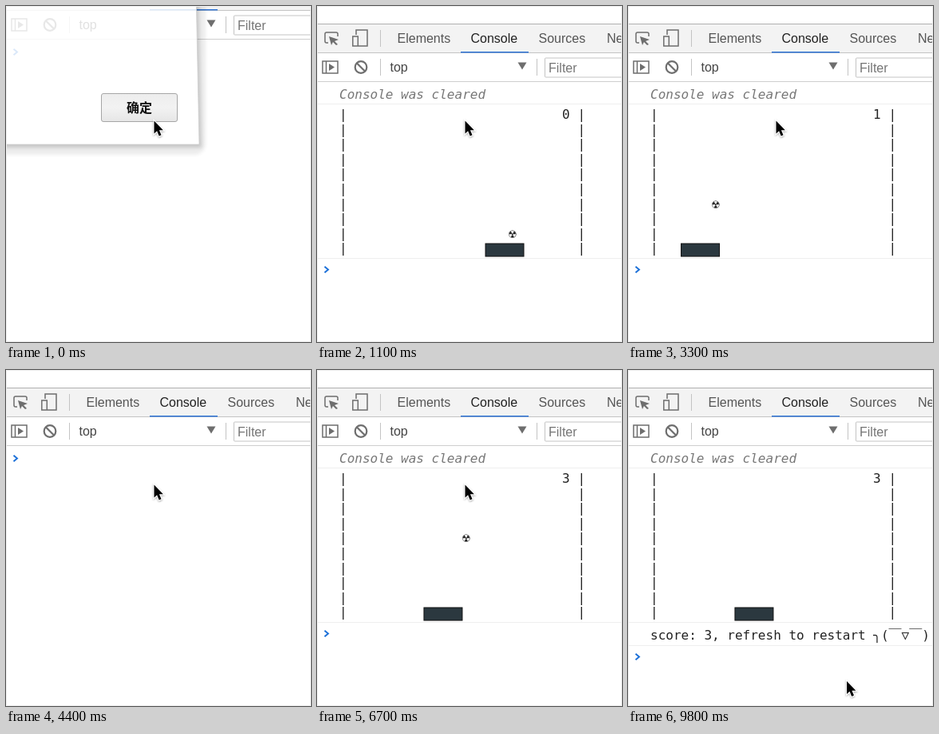
Write an HTML page that moves like this. It is 382x420 px and loops after 9900 ms.

```html
<!DOCTYPE html>
<html lang="zh">
<meta charset="utf-8">
<title>Console paddle game</title>
<style>
  html, body { margin: 0; height: 100%; overflow: hidden; background: #fff; }
  svg { display: block; }
  text { font: 16px "Liberation Sans", Arial, sans-serif; fill: #555; white-space: pre; }
  .mono text { font-family: "DejaVu Sans Mono", "Noto Sans CJK SC", monospace; fill: #222; }
  .mono .note { font-style: italic; fill: #777; }
  .icon { fill: none; stroke: #6e6e6e; stroke-width: 1.5; }
  .line { fill: none; stroke: #c4c4c4; }
  .soft { fill: none; stroke: #eee; }
</style>
<svg width="382" height="420" viewBox="0 0 382 420">
  <defs>
    <linearGradient id="face" x2="0" y2="1">
      <stop stop-color="#ededed"/><stop offset=".5" stop-color="#f2f2f2"/><stop offset="1" stop-color="#e6e6e6"/>
    </linearGradient>
    <filter id="blur" x="-20%" y="-20%" width="140%" height="140%"><feGaussianBlur stdDeviation="2"/></filter>
    <filter id="shade" x="-50%" y="-50%" width="200%" height="200%">
      <feDropShadow dx="0" dy="1" stdDeviation="1.2" flood-opacity=".4"/>
    </filter>
    <clipPath id="under"><path d="M0 0H238L242 173H0z"/></clipPath>
  </defs>
  <g id="page">
    <path fill="#f3f3f3" d="M0 22h382v36H0z"/>
    <path class="line" d="M0 58.500h382M79.500 30v21M79.500 66v21M275.500 66v21"/>
    <path class="line" style="stroke:#b0b0b0" d="M0 22.500h382"/>
    <path class="line" stroke-opacity=".8" d="M0 94.500h382"/>
    <path fill="#2f74d6" d="M180 57h85v1.500h-85z"/>
    <g class="icon">
      <path d="M14 46h-2q-2 0-2-2V35q0-2 2-2h12q2 0 2 2v3"/>
      <path d="M15 38l12 4-5 2 4 4-2 1-4-4-2 4z" fill="#6e6e6e" stroke="none"/>
      <path d="M49 36V30h14v20h-11M44.800 38h6.500v12h-6.500z"/>
      <path d="M7 69h19v15H7zM11.500 69v15"/>
      <path d="M15 72l7 4.500-7 4.500z" fill="#6e6e6e" stroke="none"/>
      <circle cx="55" cy="76.500" r="7.300" stroke-width="2.200"/>
      <path d="M50 71.500l10 10" stroke-width="2.200"/>
    </g>
    <text x="100.500" y="45.500">Elements</text>
    <text x="192.500" y="45.500" style="fill:#222">Console</text>
    <text x="277.500" y="45.500">Sources</text>
    <text x="363" y="45.500">Network</text>
    <text x="91.500" y="81.500" style="fill:#444">top</text>
    <path fill="#6e6e6e" d="M251.500 70.500h11l-5.500 9z"/>
    <rect class="line" x="285.500" y="65" width="110" height="24" rx="1" style="fill:#fff"/>
    <text x="290" y="82.500" style="fill:#757575">Filter</text>
    <g id="log" class="mono">
      <text class="note" x="28" y="116">Console was cleared</text>
      <path class="soft" d="M0 122.500h382M0 315.500h382"/>
      <g id="walls"></g>
      <text id="score" x="307" y="141"></text>
      <text id="ball" text-anchor="middle">☢</text>
      <rect id="paddle" y="297" width="48" height="16" fill="#2b383f" stroke="#111"/>
      <g id="over">
        <text x="28" y="337">score: 3, refresh to restart ╮(￣▽￣)╭</text>
        <path class="soft" d="M0 344.500h382"/>
      </g>
    </g>
    <path id="prompt" d="M9.500-3.700l4.500 3.700-4.500 3.700" fill="none" stroke="#1a6fd8" stroke-width="1.900"/>
  </g>
  <g id="dialog">
    <rect x="-20" y="-20" width="270" height="206" rx="14" opacity=".07" filter="url(#blur)"/>
    <path d="M-20-20H241L245 177H-20z" opacity=".15" filter="url(#blur)"/>
    <path d="M-20-20H238L242 173H-20z" fill="#fff" stroke="#ccc" stroke-width=".7"/>
    <g opacity=".16" clip-path="url(#under)"><use href="#page"/></g>
    <rect x="119.500" y="109.500" width="95" height="35" rx="2.500" fill="url(#face)" stroke="#a6a6a6"/>
    <text x="167" y="133" text-anchor="middle" style="font:700 16px 'Noto Sans CJK SC','Noto Sans CJK',sans-serif;fill:#111">确定</text>
  </g>
  <path class="soft" d="M.5.500h381v419H.500z"/>
  <g id="cursor" filter="url(#shade)">
    <path d="M0 0v16l3.600-3.300 2.600 6.200 2.800-1.200-2.600-6h5z" stroke="#fff" stroke-width="2" paint-order="stroke"/>
  </g>
</svg>
<script>
const $ = id => document.getElementById(id);
const LOOP = 9900, STEP = 154, CELL = 9.632, ROW = 18.6;
const colX = col => 28 + col * CELL;
const rowY = row => 141 + row * ROW;
const show = (id, on) => $(id).style.display = on ? '' : 'none';
const move = (id, x, y) => $(id).setAttribute('transform', `translate(${x} ${y})`);

for (let row = 0; row < 10; row++)
  for (const col of [0, 31])
    $('walls').innerHTML += `<text x="${colX(col)}" y="${rowY(row)}">|</text>`;

// Paddle column over time: [ms, column]
const paddleKeys = [[300, 13], [900, 19], [1500, 19], [2900, 4], [4100, 4], [5200, 11],
  [7350, 11], [7550, 7], [7800, 10], [8000, 11], [LOOP, 11]];

function paddleCol(t) {
  const i = paddleKeys.findIndex(key => key[0] > t);
  if (i < 1) return paddleKeys[0][1];
  const [t0, a] = paddleKeys[i - 1], [t1, b] = paddleKeys[i];
  return Math.round(a + (b - a) * (t - t0) / (t1 - t0));
}

function draw(t) {
  const opening = t < 100, over = t >= 8800;
  const phase = (t - 1100) / STEP + 0.5;
  const step = Math.min(48, Math.floor(phase));
  const frac = phase - Math.floor(phase);

  // The console is empty for a moment between clearing and redrawing.
  const steady = t > 7350 || (t > 4850 && t < 5300);
  const logged = t >= 200 && (steady || (frac >= 0.3 && frac < 0.9));

  show('dialog', opening);
  move('page', 0, opening ? -53 : 0);
  show('log', logged);
  show('over', over);
  show('ball', !over);
  move('prompt', 0, !logged ? 110.5 : over ? 358.5 : 329.5);

  const row = Math.abs(8 - (step + 16) % 16);
  $('ball').setAttribute('x', colX(1.5 + Math.abs(21 - step)));
  $('ball').setAttribute('y', rowY(row));
  $('paddle').setAttribute('x', colX(paddleCol(t)));
  $('score').textContent = Math.min(3, Math.floor((step + 15) / 16));

  const u = Math.min(1, Math.max(0, (t - 9420) / 380));
  const ease = u * u * (3 - 2 * u);
  move('cursor', 185.5 + 88.5 * ease, 143.5 + 245.5 * ease);
}

const start = performance.now();
(function tick() {
  draw((performance.now() - start) % LOOP);
  requestAnimationFrame(tick);
})();
</script>
</html>
```
